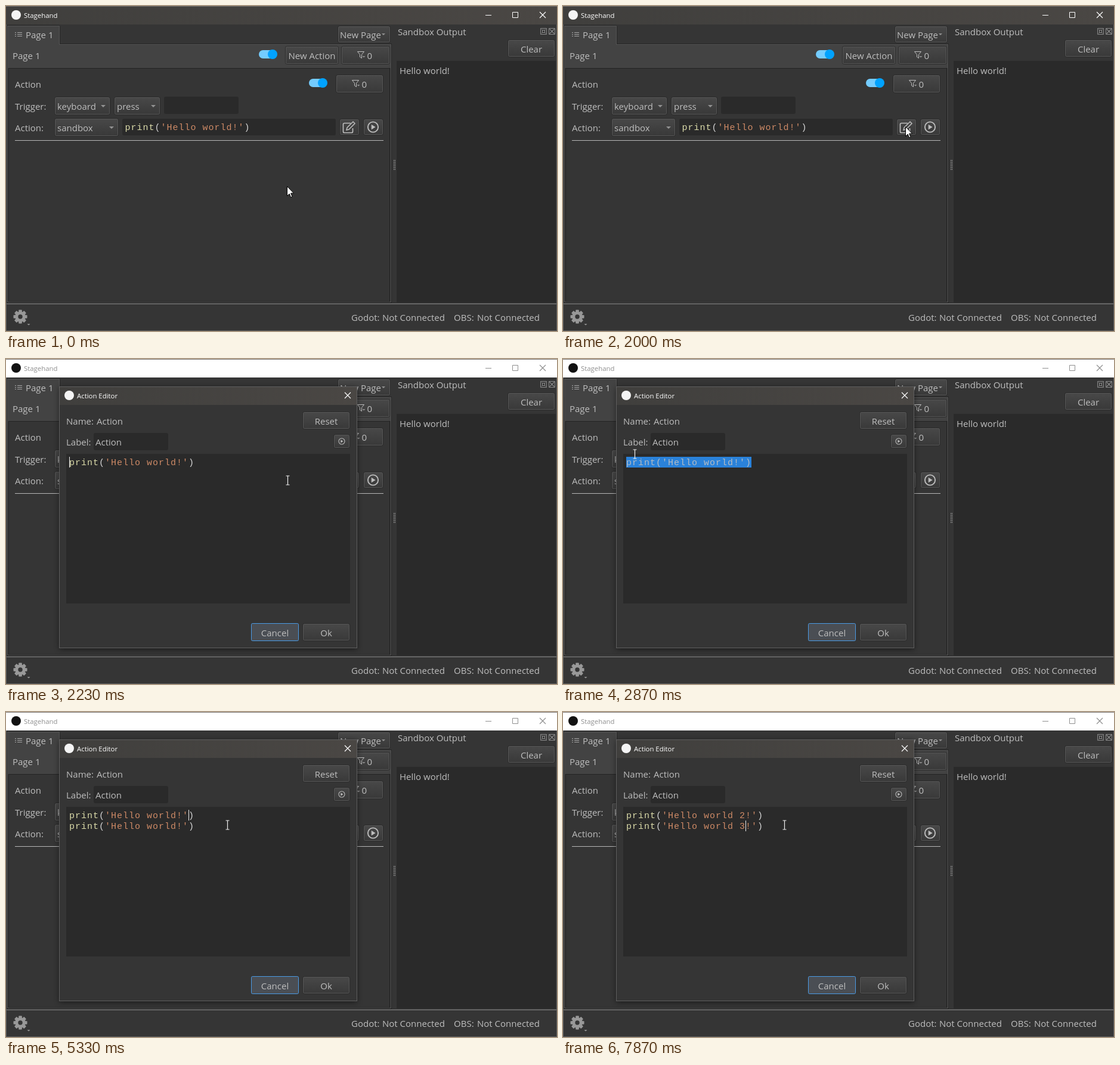
Write an HTML page that moves like this. It is 924 px wide and 545 px high and loops after 8 s.

```html
<!DOCTYPE html>
<html lang="en">
<head>
<meta charset="utf-8">
<title>Action editor</title>
<style>
html, body { margin: 0; width: 100%; height: 100%; overflow: hidden; background: #353535; }
svg { display: block; width: 924px; height: 545px; }
text { font: 15px "Open Sans", "Noto Sans", sans-serif; fill: #bebebe; white-space: pre; }
.caption { font-size: 11.4px; }
.code { font: 15px "Liberation Mono", "Courier New", monospace; letter-spacing: 1px; fill: #d4d4d4; }
.fn { fill: #dcdcaa; }
.str { fill: #ce8a66; }
.picked, .picked * { fill: #b4bcc4; }
#dialog { filter: drop-shadow(0 2px 5px #0007); }
</style>
</head>
<body>
<svg id="stage" viewBox="0 0 924 545"></svg>
<script>
const LOOP = 8000, COL = 10, ROW = 18, LEFT = 106, TOP = 164;
const stage = document.getElementById('stage');

// Drawing helpers: each returns SVG markup
const box = (x, y, w, h, fill, more = '') =>
  `<rect x="${x}" y="${y}" width="${w}" height="${h}" fill="${fill}" ${more}/>`;
const frame = (x, y, w, h, fill, line, r = 0) =>
  box(x + .5, y + .5, w - 1, h - 1, fill, `stroke="${line}" rx="${r}"`);
const text = (x, y, s, more = '') => `<text x="${x}" y="${y}" ${more}>${s}</text>`;
const path = (d, stroke = '#bebebe', w = 1, fill = 'none') =>
  `<path d="${d}" stroke="${stroke}" stroke-width="${w}" fill="${fill}"/>`;
const disc = (x, y, r, fill, more = '') =>
  `<circle cx="${x}" cy="${y}" r="${r}" fill="${fill}" ${more}/>`;
const button = (x, y, w, h) =>
  frame(x - 1, y - 1, w + 2, h + 2, 'none', '#2a2a2a', 3) + frame(x, y, w, h, 'url(#face)', '#575757', 2);
const label = (x, y, w, h, s) =>
  button(x, y, w, h) + text(x + w / 2, y + 21, s, 'text-anchor="middle"');
const field = (x, y, w, h) => box(x, y, w, h, '#2a2a2a', 'rx="3"');
const arrow = (x, y, r = 4) => path(`M${x - r} ${y}h${2 * r}l${-r} ${r}z`, 'none', 0, '#929292');
const combo = (x, y, w, s) =>
  button(x, y, w, 29) + text(x + 4, y + 21, s) + arrow(x + w - 11, y + 13);
const toggle = (x, y) => box(x, y - 7, 29, 14, '#74ccff', 'rx="7"') + disc(x + 23, y, 8, '#00a2ff');
const filter = (x, y, w) => button(x, y, w, 29) +
  path(`M${x + 26.5} ${y + 8.5}h11l-4 5v6l-3-2v-4z`) + arrow(x + 37, y + 16, 2.5) +
  text(x + 42.5, y + 21, '0');
const play = (x, y, r, w) => disc(x, y, r, 'none', `stroke="#bebebe" stroke-width="${w}"`) +
  path(`M${x - r * .32} ${y - r * .48}v${r * .96}l${r * .8} ${-r * .48}z`, 'none', 0, '#bebebe');
const cross = (x, y, r, c) => path(`M${x - r} ${y - r}l${2 * r} ${2 * r}m0 ${-2 * r}l${-2 * r} ${2 * r}`, c, 1.2);

const code = (x, y, s, cls = '') => {
  const [, fn, open, str, close] = s.match(/^(\w+)(\()(.*)(\))$/);
  return text(x, y, `<tspan class="fn">${fn}</tspan>${open}<tspan class="str">${str}</tspan>${close}`,
    `class="code ${cls}"`);
};
const hello = (tail = '') => `print('Hello world${tail}!')`;

const titleBar = (id, bg, fg, mark) => `<g id="${id}">` +
  box(0, 0, 924, 31, bg) + box(0, 0, 924, 1, '#77736f') + disc(17, 15, 8, mark) +
  text(30, 20, 'Stagehand', `class="caption" style="fill:${fg}"`) +
  path('M804 15.5h10M849.5 10.5h9v9h-9z', fg) + cross(900, 15, 5, fg) + '</g>';

const gear = (x, y) => {
  let teeth = '';
  for (let a = 0; a < 360; a += 45)
    teeth += box(x - 2.8, y - 11.5, 5.6, 6, '#989898', `rx="1" transform="rotate(${a} ${x} ${y})"`);
  return teeth + disc(x, y, 6.2, 'none', 'stroke="#989898" stroke-width="5"');
};

const grip = () => {
  let dots = '';
  for (let y = 258; y < 276; y += 3) dots += box(650, y, 1, 2, '#909090') + box(652, y, 1, 2, '#909090');
  return dots;
};

const mainWindow =
  box(0, 0, 924, 545, '#353535') +
  titleBar('active', 'url(#bar)', '#fff', '#f4f4f4') +
  titleBar('inactive', '#fff', '#8f8f8f', '#111') +
  // tab and page
  frame(1, 63, 646, 435, 'none', '#262626') + frame(2, 64, 644, 433, '#353535', '#525252') +
  box(3, 65, 642, 39, '#434343') +
  path('M1.5 64V34.5q0-2 2-2H88.5q2 0 2 2V63.5', '#262626', 1, '#434343') +
  path('M2.5 64V33.5H89.5V64.5', '#555') + box(3, 62, 86, 3, '#434343') +
  path('M15 44.5h2m2 0h8M15 47.5h2m2 0h8M15 50.5h2m2 0h8', '#a8a8a8') + text(33, 54, 'Page 1') +
  button(557, 34, 87, 27) + text(560, 54, 'New Page') + arrow(633, 46, 3) +
  text(11, 89, 'Page 1') + toggle(424, 81) + label(469, 68, 88, 29, 'New Action') + filter(563, 68, 80) +
  frame(4, 104, 640, 392, '#353535', '#242424') +
  // action rows
  text(15, 137, 'Action') + toggle(508, 129) + filter(554, 116, 78) +
  text(15, 174, 'Trigger:') + combo(82, 153, 92, 'keyboard') + combo(182, 153, 76, 'press') + field(265, 152, 125, 29) +
  text(15, 210, 'Action:') + combo(82, 189, 106, 'sandbox') + field(195, 189, 358, 28) + code(199.5, 208, hello()) +
  button(560, 190, 32, 26) + button(600, 190, 32, 26) +
  path('M578 196.5H567.5q-2 0-2 2V210.5q0 2 2 2H579.5q2 0 2-2V205', '#bebebe', 1.7) +
  path('M571 208l1-4 10-10 3 3-10 10z', '#bebebe', 1.5) + play(615.5, 203, 8.6, 1.9) +
  box(15, 225, 618, 1, '#b8b8b8') + grip() +
  // output
  text(657, 49, 'Sandbox Output') +
  path('M896.5 37.5h10v10h-10zM899.5 40.5h4v4h-4zM898 39l2 2m3 0l2-2m-7 7l2-2m3 0l2 2M910.5 37.5h10v10h-10z', '#8c8c8c') +
  cross(915.5, 42.5, 4, '#8c8c8c') + label(842, 57, 78, 28, 'Clear') +
  box(655, 92, 267, 405, '#2a2a2a') + text(660, 114, 'Hello world!') +
  // status bar
  box(0, 499, 924, 1, '#8c8c8c') + gear(24, 521) + arrow(38, 533, 2.5) +
  text(579, 528, 'Godot:') + text(631, 528, 'Not Connected') + text(751, 528, 'OBS:') + text(790, 528, 'Not Connected') +
  path('M.5 31V544.5H923.5V31', '#5e5e5e');

const dialogWindow = '<g id="dialog">' +
  frame(89, 46, 500, 439, '#353535', '#5f5f5f') + box(90, 47, 498, 30, 'url(#bar)') +
  disc(106, 61, 8, '#f4f4f4') + text(119, 66, 'Action Editor', 'class="caption" style="fill:#fff"') + cross(573, 61, 5, '#fff') +
  text(101, 110, 'Name:') + text(152, 110, 'Action') + label(498, 89, 78, 28, 'Reset') +
  text(101, 145, 'Label:') + field(147, 124, 125, 29) + text(150, 145, 'Action') +
  button(550, 127, 26, 22) + play(563, 138, 5, 1.1) +
  box(101, 159, 476, 251, '#2a2a2a') + '<g id="editor"></g>' +
  frame(411, 443, 80, 30, '#4a4e54', '#4a9be6', 2) + text(451, 465, 'Cancel', 'text-anchor="middle"') +
  label(498, 444, 78, 28, 'Ok') + '</g>';

stage.innerHTML = `<defs>
  <linearGradient id="face" x2="0" y2="1"><stop stop-color="#484848"/><stop offset="1" stop-color="#393939"/></linearGradient>
  <linearGradient id="bar"><stop stop-color="#403f3d"/><stop offset="1" stop-color="#4a4744"/></linearGradient>
  </defs>` + mainWindow + dialogWindow +
  '<g id="pointer">' + path('M0 0V16L3.7 12.5 6.2 18.3 8.5 17.3 6.1 11.5H11Z', '#000', 1, '#fff') + '</g>' +
  '<g id="beam">' + path('M-3-7.5h2.5l.5.5.5-.5h2.5M0-7V7M-3 7.5h2.5l.5-.5.5.5h2.5', '#f0f0f0', 1.2) + '</g>';

const $ = id => document.getElementById(id);
const show = (id, on) => $(id).style.display = on ? '' : 'none';

// Mouse path: time, x, y
const mouse = [
  [930, 471, 302], [1250, 486, 272], [1530, 509, 234], [1730, 556, 207], [1850, 575, 202], [2010, 574, 202],
  [2100, 530, 202], [2350, 420, 203], [2570, 373, 192], [2650, 371, 177], [2870, 120, 159], [2980, 120, 159],
  [3200, 290, 200], [3400, 370, 209], [3480, 374, 207], [3700, 371, 189]
];
const mouseAt = t => {
  const i = mouse.findIndex(k => k[0] > t);
  if (i < 0) return mouse.at(-1).slice(1);
  if (!i) return mouse[0].slice(1);
  const [a, b] = [mouse[i - 1], mouse[i]], p = (t - a[0]) / (b[0] - a[0]);
  return [a[1] + (b[1] - a[1]) * p, a[2] + (b[2] - a[2]) * p];
};

// Edits: time, caret row, caret column (-1 hidden), first line's insert, second line's insert (null: no line)
const edits = [
  [0, 0, 0, '', null], [2650, 0, -1, '', null], [3600, 0, 21, '', null], [4150, 1, 0, '', null], [4700, 1, -1, '', null],
  [4800, 1, 21, '', ''], [5170, 0, 21, '', ''], [5330, 0, 20, '', ''], [5530, 0, 19, '', ''], [5730, 0, 18, '', ''],
  [6030, 0, 19, ' ', ''], [6230, 0, 20, ' 2', ''], [6270, 0, -1, ' 2', ''], [6530, 1, 20, ' 2', ''],
  [6700, 1, 19, ' 2', ''], [6870, 1, 18, ' 2', ''], [7100, 1, 19, ' 2', ' '], [7300, 1, 20, ' 2', ' 3'],
  [7330, 1, -1, ' 2', ' 3'], [7870, 1, 20, ' 2', ' 3']
];

function drawEditor(t, mx) {
  const [, row, col, first, second] = edits.findLast(e => e[0] <= t);
  const dragging = t >= 2650 && t < 3600;
  const from = t > 2870 ? 0 : Math.max(0, Math.min(21, Math.round((mx - LEFT) / COL) - 1));
  const picked = dragging && from < 21;
  let out = '';
  if (picked) out += box(LEFT + from * COL, TOP, (21 - from) * COL, ROW, '#2a82da');
  out += code(LEFT, TOP + 14, hello(first), picked && !from ? 'picked' : '');
  if (second !== null) out += code(LEFT, TOP + ROW + 14, hello(second));
  if (col >= 0) out += box(LEFT + col * COL, TOP + row * ROW, 1, ROW, '#eee');
  $('editor').innerHTML = out;
}

function draw() {
  const t = performance.now() % LOOP;
  const [mx, my] = mouseAt(t);
  const p = Math.max(0, Math.min(1, (t - 2020) / 200));
  const scale = .9 + .1 * (1 - (1 - p) ** 3);
  show('active', p === 0);
  show('inactive', p > 0);
  show('dialog', p > 0);
  $('dialog').style.opacity = Math.min(1, p * 1.4);
  $('dialog').setAttribute('transform', p < 1 ? `translate(339 265.5) scale(${scale}) translate(-339 -265.5)` : '');
  drawEditor(t, mx);

  const inside = (l, top, r, b) => mx >= l && mx < r && my >= top && my < b;
  const typing = p ? inside(101, 159, 577, 410) : inside(195, 189, 553, 217);
  show('beam', typing);
  show('pointer', !typing);
  const at = `translate(${Math.round(mx) + .5} ${Math.round(my) + .5})`;
  $('beam').setAttribute('transform', at);
  $('pointer').setAttribute('transform', at);
  requestAnimationFrame(draw);
}
draw();
</script>
</body>
</html>
```
